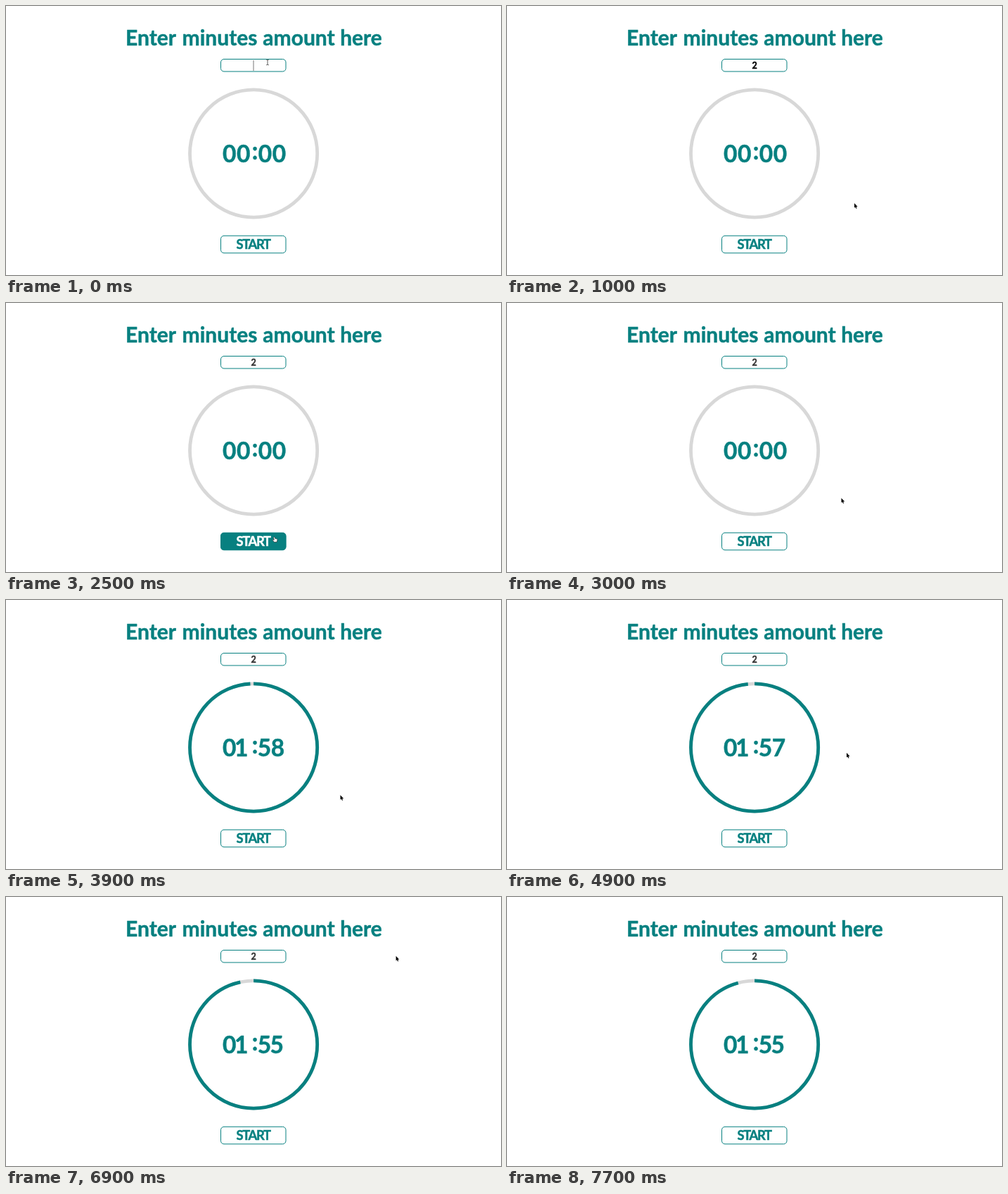
Recreate the animation shown at these times as an HTML page. Size 704 px wide and 382 px high, loop 8000 ms.

```html
<!DOCTYPE html>
<html lang="en">
<head>
<meta charset="utf-8">
<title>Countdown timer</title>
<style>
  html, body { margin: 0; width: 100%; height: 100%; overflow: hidden; background: #fff; }
  svg { display: block; width: 100%; height: 100%; }
  text { font-family: Lato, "Open Sans", sans-serif; font-weight: 700; text-anchor: middle; }
  .teal { fill: #078080; stroke: #078080; stroke-width: .5; stroke-linejoin: round; }
  .title { font-size: 30px; }
  .time { font: 700 33.5px "Open Sans", Lato, sans-serif; }
  .box { fill: #fff; stroke: #078080; stroke-width: 1; }
  .ring { fill: none; stroke: #d8d8d8; stroke-width: 4.8; }
  #arc { stroke: #078080; }
</style>
</head>
<body>
<svg viewBox="0 0 704 382">
  <g class="teal title">
    <text x="206" y="56">Enter</text>
    <text x="304" y="56">minutes</text>
    <text x="416.5" y="56">amount</text>
    <text x="505" y="56">here</text>
  </g>

  <rect class="box" x="305.5" y="75.5" width="92.5" height="17.5" rx="4.5"/>
  <text id="entry" x="352" y="88.8" font-size="12.5" stroke-width=".4">2</text>
  <path id="caret" d="M0 77V92" stroke="#777" stroke-width="1"/>

  <circle class="ring" cx="352.1" cy="209.5" r="90.6"/>
  <circle class="ring" id="arc" cx="352.1" cy="209.5" r="90.6" pathLength="120" transform="rotate(-90 352.1 209.5)"/>
  <g class="teal time" id="clock">
    <text y="221.6">0</text>
    <text y="221.6">0</text>
    <text x="354" y="218.4">:</text>
    <text y="221.6">0</text>
    <text y="221.6">0</text>
  </g>

  <rect class="box" x="305.5" y="326.3" width="92.5" height="24.5" rx="4.5"/>
  <rect id="fill" x="305.2" y="326" width="93.1" height="25.1" rx="4.8" fill="#078080"/>
  <text id="label" x="351.6" y="345.4" font-size="18.4" letter-spacing="-1.4" stroke-width=".5">START</text>

  <g id="cursor">
    <path id="beam" d="M-1.8 -3.8Q0 -3.8 0 -2.6Q0 -3.8 1.8 -3.8M0 -2.6V2.6M-1.8 3.8Q0 3.8 0 2.6Q0 3.8 1.8 3.8" fill="none" stroke="#333" stroke-width=".8"/>
    <path id="arrow" d="M0 0V6.6L1.4 5.4L2.5 7.7L3.6 7.2L2.6 4.9H4.6Z" fill="#000"/>
    <path id="hand" d="M-1.6 -3.4Q-.9 -4.1 -.3 -3.2L.2 -1.6L2.8 -1Q3.6 -.6 3.4 .6L2.6 3.6H-1L-3.4 .7Q-3.2 -.4 -1.1 .4L-2 -2.6Z" fill="#fff" stroke="#333" stroke-width=".7"/>
  </g>
</svg>
<script>
const LOOP = 8000, STEP = 100;
const $ = id => document.getElementById(id);
const show = (el, on) => el.setAttribute('visibility', on ? 'visible' : 'hidden');
const clamp = v => Math.min(1, Math.max(0, v));
const smooth = v => v * v * (3 - 2 * v);

// [ms, x, y]
const path = [
  [400, 372, 80], [600, 398, 112], [800, 460, 222], [1000, 494, 280],
  [1100, 494, 280], [1300, 446, 306], [1500, 386, 334], [1600, 375, 339],
  [2400, 376, 339], [2500, 382.5, 336], [2700, 420, 318], [3000, 475.5, 277],
  [4400, 475.5, 277], [4900, 483, 217], [6100, 483, 217], [6600, 555, 104],
  [6800, 555, 104], [7300, 553, 3]
];

function cursorAt(t) {
  const i = path.findIndex(p => p[0] > t);
  if (i === 0) return path[0].slice(1);
  if (i < 0) return path[path.length - 1].slice(1);
  const a = path[i - 1], b = path[i], k = (t - a[0]) / (b[0] - a[0]);
  return [a[1] + (b[1] - a[1]) * k, a[2] + (b[2] - a[2]) * k];
}

const digits = [...$('clock').children];
const setDigit = (i, value, x) => {
  digits[i].textContent = value;
  digits[i].setAttribute('x', x);
};

function drawClock(t) {
  const ticks = t < 3100 ? 0 : Math.floor((t - 3100) / 1000) + 1;
  show($('arc'), ticks > 0);
  $('arc').setAttribute('stroke-dasharray', `${120 - ticks} 120`);
  setDigit(0, 0, 317.8);
  if (!ticks) {
    setDigit(1, 0, 337.8);
    setDigit(3, 0, 368.5);
    setDigit(4, 0, 388.5);
  } else {
    const last = 9 - Math.min(ticks, 4);
    setDigit(1, 1, 334.6);
    setDigit(3, 5, 367.5);
    setDigit(4, last, last === 5 ? 385.2 : 386.5);
  }
}

function drawEntry(t) {
  const typed = t >= 500, color = t < 2100 ? '#000' : '#333';
  show($('entry'), typed);
  $('entry').setAttribute('fill', color);
  $('entry').setAttribute('stroke', color);
  show($('caret'), t < 300 || (t >= 500 && t < 1000) || (t >= 1500 && t < 1900));
  $('caret').setAttribute('transform', `translate(${typed ? 355.5 : 352})`);
}

function drawButton(t) {
  const hover = smooth(clamp((t - 1500) / 400)) - smooth(clamp((t - 2600) / 400));
  const mix = (a, b) => Math.round(a + (b - a) * hover);
  const color = `rgb(${mix(7, 255)},${mix(128, 255)},${mix(128, 255)})`;
  $('fill').setAttribute('opacity', hover);
  $('label').setAttribute('fill', color);
  $('label').setAttribute('stroke', color);
}

function drawCursor(t) {
  const [x, y] = cursorAt(t);
  const inX = x > 305 && x < 398;
  const beam = inX && y > 75 && y < 93;
  const hand = inX && y > 326 && y < 351;
  const on = t < 7400;
  $('cursor').setAttribute('transform', `translate(${x} ${y})`);
  show($('beam'), on && beam);
  show($('hand'), on && hand);
  show($('arrow'), on && !beam && !hand);
}

const start = performance.now();
function frame() {
  const now = (performance.now() - start) % LOOP;
  const t = Math.floor(now / STEP) * STEP;
  drawEntry(t);
  drawClock(t);
  drawButton(t);
  drawCursor(t);
  requestAnimationFrame(frame);
}
frame();
</script>
</body>
</html>
```
